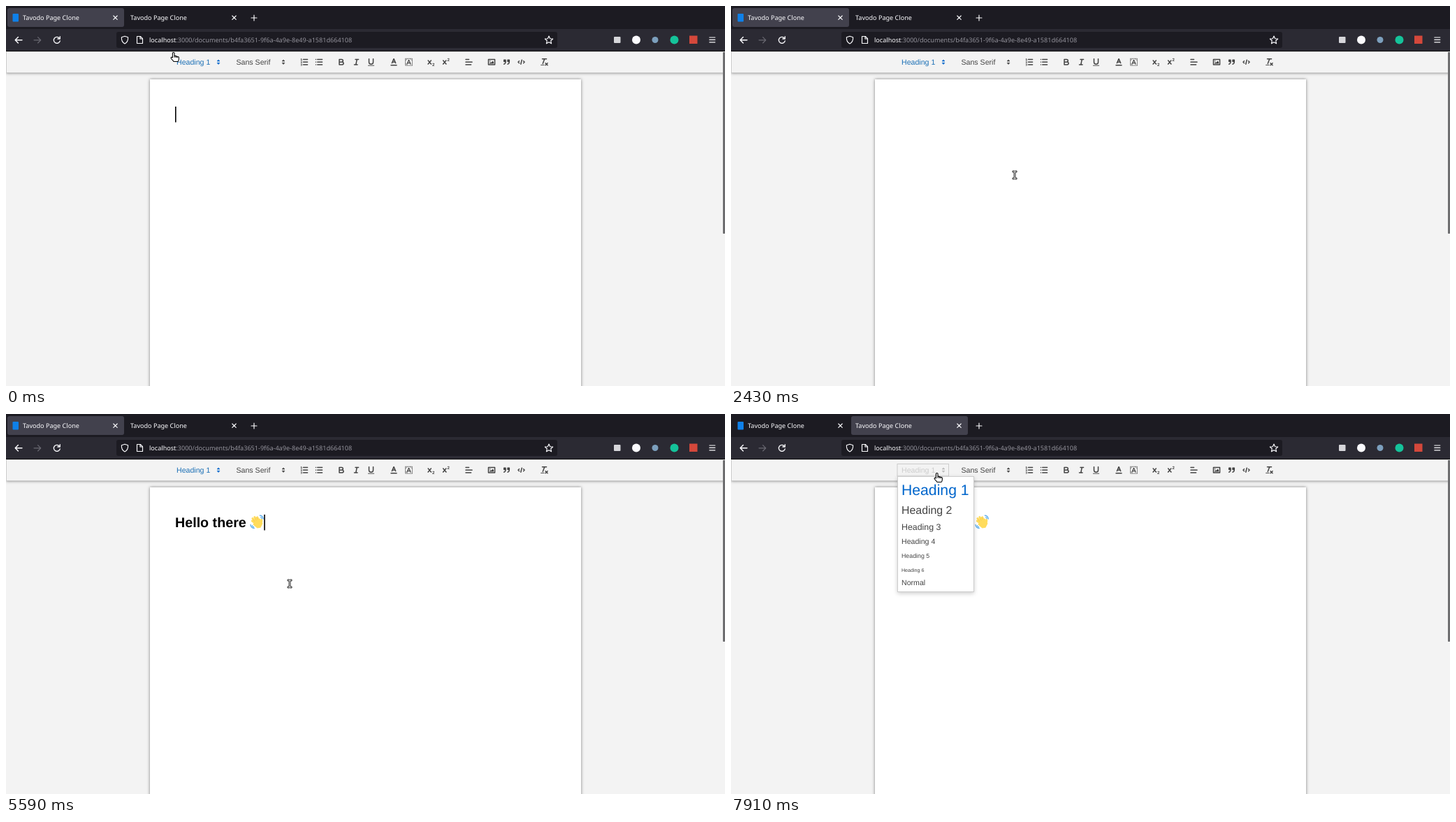
These frames come from a looping animation (1029 px wide and 544 px high, 7990 ms). An HTML page:

```html
<!DOCTYPE html>
<html lang="en">
<head>
<meta charset="utf-8">
<title>Editor</title>
<style>
html, body { margin: 0; width: 100%; height: 100%; overflow: hidden; background: #f3f3f3; }
#stage { position: relative; width: 1029px; height: 544px; overflow: hidden; }
#stage > * { position: absolute; box-sizing: border-box; }
#tabs { left: 0; top: 0; width: 1029px; height: 34px; background: #1c1b22; }
#nav { left: 0; top: 33px; width: 1029px; height: 32px; background: #2b2a33; border-bottom: 1px solid #0c0c0d; }
#url { left: 158px; top: 37px; width: 631px; height: 23px; border-radius: 3px; background: #1c1b22; }
.tab { top: 3px; width: 167px; height: 27px; border-radius: 3px; }
.tab.hover { background: #35343e; }
.tab.active { background: #42414d; }
#tab1 { left: 1.5px; }
#tab2 { left: 172px; }
#page { left: 206px; top: 105px; width: 617px; height: 500px; background: #fff; box-shadow: 0 0 4px rgba(0,0,0,.5); }
#bar { left: 0; top: 65px; width: 1029px; height: 31px; background: #f3f3f3; border: 1px solid #ccc; box-shadow: 0 0 4px rgba(0,0,0,.5); clip-path: inset(0 0 -10px 0); }
#menu { left: 237.5px; top: 88.5px; width: 110px; height: 166.5px; background: #fff; border: 1px solid #ccc; box-shadow: 0 1.5px 6px rgba(0,0,0,.2); }
#scroll { left: 1026px; top: 66px; width: 2.5px; height: 260px; border-radius: 1px; background: #6e6e70; }
svg { left: 0; top: 0; overflow: hidden; }
text { white-space: pre; text-rendering: geometricPrecision; }
.ui { font: 9.08px "Noto Sans", sans-serif; fill: #fbfbfe; }
.ql { font: 10.6px "Liberation Sans", Arial, sans-serif; fill: #444; }
#typed { font: bold 19.7px "Liberation Sans", Arial, sans-serif; fill: #000; }
.line { fill: none; stroke: #fbfbfe; stroke-width: 1.15; stroke-linecap: round; stroke-linejoin: round; }
.icon { fill: none; stroke: #444; stroke-width: 2; stroke-linecap: round; stroke-linejoin: round; }
.icon .f { fill: #444; stroke: none; }
.icon .thin { stroke-width: 1; }
.icon .both { fill: #444; }
.icon text { font: bold 8px "Liberation Sans", Arial, sans-serif; fill: #444; stroke: none; }
</style>
</head>
<body>
<div id="stage">
  <div id="tabs"></div>
  <div id="tab1" class="tab"></div>
  <div id="tab2" class="tab"></div>
  <div id="nav"></div>
  <div id="url"></div>
  <div id="page"></div>
  <div id="bar"></div>
  <svg width="1029" height="544">
    <rect x="9.5" y="11" width="8.5" height="11.5" rx="1" fill="#0f80e8"/>
    <g class="ui">
      <text x="24" y="20.2">Tavodo Page Clone</text>
      <text x="178" y="20.2">Tavodo Page Clone</text>
      <text x="205" y="51.9">localhost<tspan fill="#93929b">:3000/documents/b4fa3651-9f6a-4a9e-8e49-a1581d664108</tspan></text>
    </g>
    <g class="line">
      <path d="M153.8 14l5.4 5.4m0-5.4l-5.4 5.4M323.8 14l5.4 5.4m0-5.4l-5.4 5.4M355 13v8m-4-4h8"/>
      <path stroke-width="1.4" d="M23 48.8H13.2m4.2-4.2l-4.2 4.2 4.2 4.2"/>
      <path stroke="#6b6a73" d="M40 48.8h9.8m-4.2-4.2l4.2 4.2-4.2 4.2"/>
      <path stroke-width="1.3" d="M76.5 46.2a4.5 4.5 0 1 0 .8 3.6M77.3 43.6v3.4h-3.4"/>
      <path d="M170 43.3l4.6 1.5c.3 4.4-1.1 7.4-4.6 9.1-3.5-1.7-4.9-4.7-4.6-9.1z"/>
      <path d="M187.5 43.5h4.8l3.2 3.2v6.8h-8zM192 43.8v3.2h3.2"/>
      <path d="M777 43l1.7 3.7 4 .4-3 2.7.9 4-3.6-2.1-3.6 2.1.9-4-3-2.7 4-.4z"/>
      <path d="M1006.8 45h8m-8 3.4h8m-8 3.4h8"/>
    </g>
    <rect x="870" y="44" width="9.5" height="9" rx="1" fill="#d6d6da"/>
    <circle cx="902" cy="48.5" r="6" fill="#fbfbfe"/>
    <circle cx="929" cy="48.5" r="4.5" fill="#7c9fbd"/>
    <circle cx="956.5" cy="48.5" r="6" fill="#15c39a"/>
    <rect x="978" y="42.5" width="11.5" height="11.5" fill="#d4483b"/>

    <rect id="box" x="238" y="71.5" width="73.5" height="17.5" fill="none" stroke="#ccc"/>
    <text id="label" class="ql" x="244" y="84">Heading 1</text>
    <text class="ql" x="329.5" y="84">Sans Serif</text>
    <g id="icons"></g>

    <text id="typed" x="242" y="162"></text>
    <g id="wave" transform="translate(348.8 143.8) scale(.585)" fill="none" stroke-linecap="round">
      <g stroke="#ffdc5d" stroke-width="5">
        <path d="M17 24L6 16M19 21L7 10M22 19L12 6.5M25 18L18.5 7M27 22Q30 18 29 13"/>
        <path d="M15 17l9-4 5 9-4 8-6 1-8-7z" fill="#ffdc5d"/>
      </g>
      <path d="M12 17l-4-4.5M16 14l-4-5M20 12l-3-4" stroke="#efb941" stroke-width=".9"/>
      <path d="M25 2.5Q32 3 33.5 11M27 7Q29.5 7.5 30 10M2 25Q3 33 11 34M6 27Q7 30 10 31" stroke="#5dadec" stroke-width="2.2"/>
    </g>
    <rect id="caret" y="144" width="1.6" height="22.5"/>
  </svg>
  <div id="menu"></div>
  <div id="scroll"></div>
  <svg width="1029" height="544">
    <g id="options" class="ql"></g>
    <g id="arrow"><path d="M0 0v12.2l2.9-2.6 1.9 4.2 2-.9-1.9-4.1 3.9-.2z" fill="#000" stroke="#fff" stroke-width="1"/></g>
    <g id="hand"><path d="M-1.6 7V.8a1.3 1.3 0 0 1 2.6 0V4.6c1-.5 1.9-.2 2.2.4 1-.4 1.8 0 2 .6 1.2-.4 2.2.1 2.2 1.3 0 3.6-.7 5.6-2 5.6H0C-1 10.8-3.7 8.8-3.9 7.5-4 6.2-2.5 6-1.6 7zM1 4.6v2.2M3.2 5.2v1.8M5.2 5.8v1.5" fill="#fff" stroke="#000" stroke-width="1.1" stroke-linejoin="round"/></g>
    <g id="beam"><path id="beamShape" d="M-3-6h2.2L0-5.4.8-6H3v2H1v8h2v2H.8L0 5.4-.8 6H-3V4h2v-8h-2z" fill="#ddd" stroke="#222" stroke-width=".9"/></g>
  </svg>
</div>
<script>
const $ = id => document.getElementById(id);
const LOOP = 7990, STEP = 80;

// Toolbar icons on an 18-unit grid, keyed by centre x.
const cross = '<path d="M3.2 6.2l5.6 6.6M8.8 6.2l-5.6 6.6"/>';
const sort = '<path class="both" stroke-width="1.2" d="M7 11l2 2.2 2-2.2zM7 7l2-2.2L11 7z"/>';
const letterA = '<path d="M5.5 11L9 3l3.5 8M11.6 9H6.4"/>';
const icons = [
  [427, '<path d="M7 4h8M7 9h8M7 14h8"/><path class="thin" d="M2.5 5.5h2M3.5 5.5v-3l-1 .5M2.5 8q2-1 2 .3L2.5 10.500h2M2.500 13h2l-1 1q1.500.3 1 1.300-.8.800-2 .2"/>'],
  [448, '<path d="M6 4h9M6 9h9M6 14h9M3 4h0M3 9h0M3 14h0"/>'],
  [480, '<path d="M5 4h4.500a2.500 2.500 0 0 1 0 5H5zM5 9h5.500a2.500 2.500 0 0 1 0 5H5z"/>'],
  [501.5, '<path d="M7 4h6M5 14h6M8 14l2-10"/>'],
  [522.5, '<path d="M5 3v6a4 4 0 0 0 8 0V3"/><rect class="f" x="3" y="15" width="12" height="1.2"/>'],
  [555, letterA + '<path d="M3 15h12" stroke-linecap="butt"/>'],
  [576.5, '<path class="thin" stroke-dasharray="1 1.5" d="M2.500 2.500h13v13h-13zM3 6l3-3M12 3l3 3M3 12l3 3"/><path stroke-width="1.6" d="M5.500 13L9 5l3.500 8M11.600 11H6.400"/>'],
  [608.5, cross + '<text x="11" y="16">2</text>'],
  [630, cross + '<text x="11" y="8">2</text>'],
  [662.5, '<path d="M3 9h12M3 14h10M3 4h6"/>'],
  [695, '<rect x="3" y="4" width="12" height="10"/><circle class="f" cx="6" cy="7" r="1"/><path class="f" d="M5 12v-1l2-2 1 1 3-3 2 2v3z"/>'],
  [716.5, '<path class="both" d="M4 5h3v3H4zM11 5h3v3h-3z"/><path d="M7 8c0 4-3 5-3 5M14 8c0 4-3 5-3 5"/>'],
  [737.5, '<path d="M5 7L3 9l2 2M13 7l2 2-2 2M10 5L8 13"/>'],
  [770.5, '<path d="M5 3h8M6 12L9.350 3M11 11l4 4M15 11l-4 4"/><rect class="f" x="2" y="14" width="7" height="1.2"/>'],
  [304, sort, 'sort'],
  [397, sort]
];
$('icons').innerHTML = icons.map(([x, art, id]) =>
  `<g class="icon" ${id ? `id="${id}"` : ''} transform="translate(${x - 6.8} 73.4) scale(.757)">${art}</g>`).join('');

const options = [['Heading 1', 21.2, 116], ['Heading 2', 15.9, 143.3], ['Heading 3', 12.4, 165.5],
  ['Heading 4', 10.6, 186.4], ['Heading 5', 8.8, 206], ['Heading 6', 7.1, 225.6], ['Normal', 10.6, 245.3]];
$('options').innerHTML = options.map(([name, size, y], i) =>
  `<text x="244" y="${y}" style="font-size:${size}px${i ? '' : ';fill:#06c'}">${name}</text>`).join('');

// Pointer moves: first step, last step, destination.
const moves = [
  [80, 240, 197, 5], [560, 960, 118, 11], [1370, 1690, 406, 242], [5590, 5590, 406, 243],
  [5670, 5990, 325, 72], [6390, 6390, 211, 1], [6710, 7430, 392, 176], [7510, 7910, 295, 85]
];
const phrase = 'Hello there ';
const keyTimes = [2990, 3230, 3310, 3470, 3710, 3870, 3950, 4120, 4200, 4280, 4440, 4600];
const PASTE = 5010;

const within = (t, a, b) => t >= a && t < b;
const show = (id, on) => { $(id).style.display = on ? '' : 'none'; };

function pointer(t) {
  let x = 240, y = 67;
  for (const [a, b, toX, toY] of moves) {
    if (t < a) break;
    const k = Math.min(1, (Math.floor((t - a) / STEP) + 1) / ((b - a) / STEP + 1));
    const e = k * k * (3 - 2 * k);
    x += (toX - x) * e;
    y += (toY - y) * e;
  }
  return [x, y];
}

function scrollAlpha(t) {
  if (within(t, 480, 1370) || within(t, 2990, 5590) || within(t, 6550, 6790)) return 0;
  if (within(t, 2670, 2990)) return 0.75 - 0.25 * Math.min(2, Math.floor((t - 2670) / STEP));
  return 1;
}

function draw(t) {
  const second = within(t, 480, 1290) || t >= 6550;
  const [x, y] = pointer(t);

  const overTab = y < 31 ? (x < 169 ? 1 : x > 171 && x < 340 ? 2 : 0) : 0;
  for (const n of [1, 2]) {
    const active = n === (second ? 2 : 1);
    $('tab' + n).className = 'tab' + (active ? ' active' : overTab === n ? ' hover' : '');
  }

  for (const id of ['menu', 'options', 'box']) show(id, second);
  const tint = second ? '#ccc' : within(t, PASTE, PASTE + STEP) ? '#444' : '#06c';
  $('label').style.fill = tint === '#06c' ? '#1a6fb5' : tint;
  $('sort').style.stroke = second ? '#bbb' : '#06c';
  $('sort').firstChild.style.fill = second ? '#bbb' : '#06c';

  const typed = $('typed');
  typed.textContent = phrase.slice(0, keyTimes.filter(k => t >= k).length);
  const pasted = t >= PASTE;
  show('wave', pasted);
  const end = typed.textContent ? typed.getComputedTextLength() : 0;
  $('caret').setAttribute('x', pasted ? 369.2 : 242 + end);
  const blink = within(t, 2430, 2990) || within(t, 4760, PASTE) || within(t, 6230, 6550);
  show('caret', !second && !blink);

  $('scroll').style.opacity = scrollAlpha(t);

  const onMenu = second && within(x, 238, 347) && within(y, 72, 255);
  const onPicker = within(y, 65, 96) && within(x, 238, 402);
  const onPage = y > 105 && within(x, 206, 823);
  const kind = onMenu || onPicker ? 'hand' : onPage ? 'beam' : 'arrow';
  const hidden = within(t, 6070, 6390);
  for (const id of ['arrow', 'hand', 'beam']) show(id, id === kind && !hidden);
  $(kind).setAttribute('transform', `translate(${x} ${y})`);
}

const start = performance.now();
function tick() {
  draw((performance.now() - start) % LOOP);
  requestAnimationFrame(tick);
}
tick();
</script>
</body>
</html>
```
